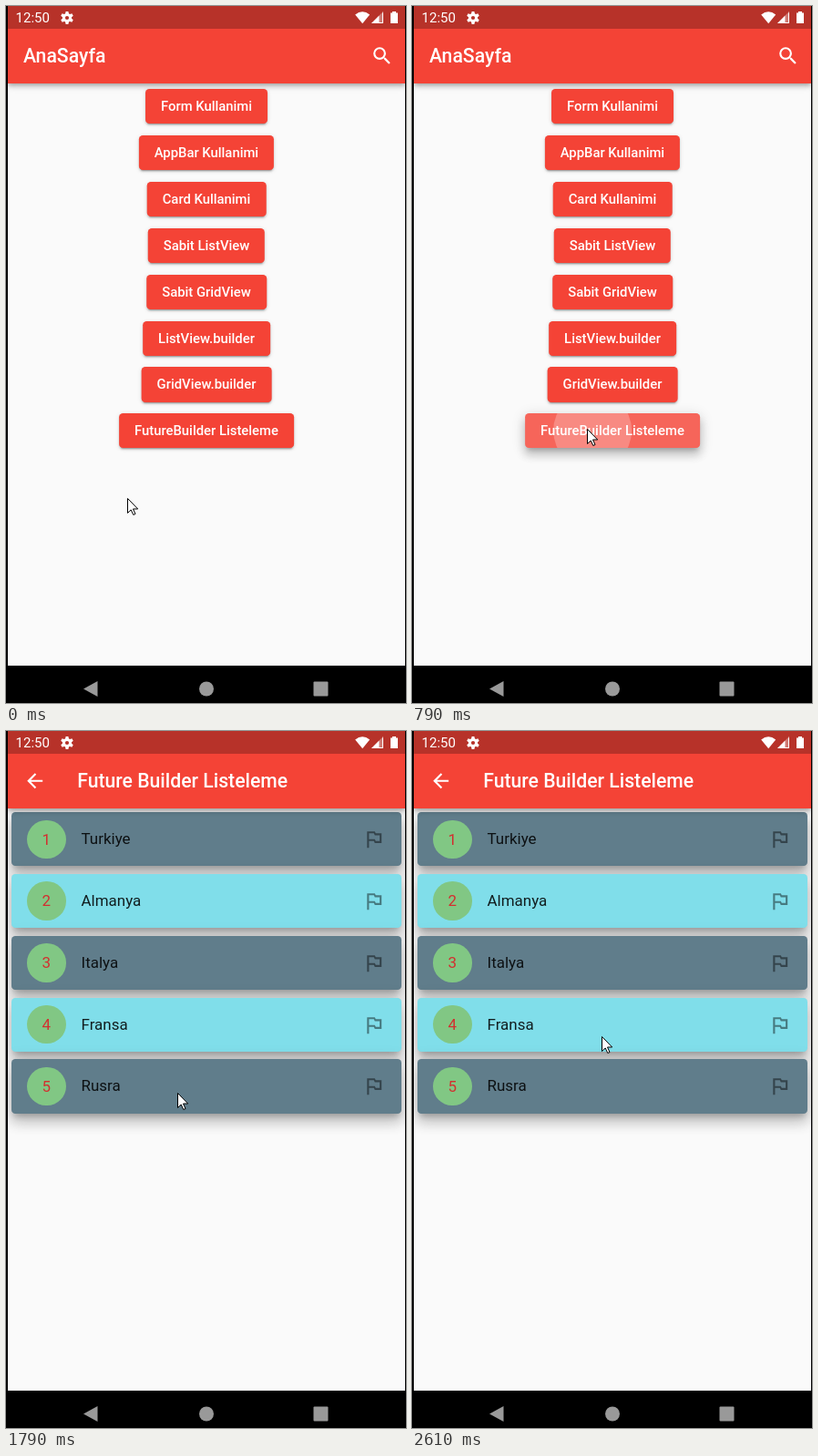
An HTML page for the animation above (3410 ms loop, 439x765 px).

```html
<!DOCTYPE html>
<html lang="tr">
<head>
<meta charset="utf-8">
<title>AnaSayfa</title>
<style>
:root { --dp: 1.06px; }
html, body { margin: 0; width: 100%; height: 100%; overflow: hidden; background: #000; }
body { position: relative; font-family: Roboto, sans-serif; }
div, svg { position: absolute; white-space: nowrap; }
svg { overflow: visible; }
#screen { left: 2px; top: 0; width: 436px; height: 724px; background: #fafafa; overflow: hidden; }
.page { inset: 0; }
.bar {
  left: 0; top: 0; width: 436px; height: calc(80 * var(--dp)); background: #f44336;
  box-shadow: 0 2px 4px -1px #0003, 0 4px 5px #00000024, 0 1px 10px #0000001f;
}
.title {
  top: calc(24 * var(--dp)); line-height: calc(56 * var(--dp));
  font-size: calc(20 * var(--dp)); font-weight: 500; color: #fff;
}
.btn {
  left: 50%; transform: translateX(-50%); height: calc(36 * var(--dp));
  padding: 0 calc(16 * var(--dp)); border-radius: calc(4 * var(--dp)); overflow: hidden;
  background: #f44336; color: #fff; font-size: calc(14 * var(--dp)); font-weight: 500;
  line-height: calc(36 * var(--dp));
  box-shadow: 0 3px 1px -2px #0003, 0 2px 2px #00000024, 0 1px 5px #0000001f;
}
.btn span { position: relative; }
.btn.press1 {
  background: #f55349;
  box-shadow: 0 3px 4px -1px #0003, 0 5px 7px #00000024, 0 1px 10px #0000001f;
}
.btn.press2 {
  background: #f6655a;
  box-shadow: 0 5px 5px -3px #0003, 0 8px 10px 1px #00000024, 0 3px 14px 2px #0000001f;
}
.ripple { border-radius: 50%; background: #ffffff3d; transform: translate(-50%, -50%); }
.card {
  left: calc(4 * var(--dp)); right: calc(4 * var(--dp)); height: calc(56 * var(--dp));
  border-radius: calc(4 * var(--dp)); font-size: calc(16 * var(--dp));
  line-height: calc(56 * var(--dp)); color: #000000de;
  box-shadow: 0 6px 6px -3px #0003, 0 10px 14px 1px #00000024, 0 4px 18px 3px #0000001f;
}
.num {
  left: calc(16 * var(--dp)); top: calc(8 * var(--dp));
  width: calc(40 * var(--dp)); height: calc(40 * var(--dp)); line-height: calc(40 * var(--dp));
  border-radius: 50%; background: #81c784; color: #d32f2f; text-align: center;
}
.name { left: calc(72 * var(--dp)); }
.icon { width: calc(24 * var(--dp)); height: calc(24 * var(--dp)); }
.flag { right: calc(16 * var(--dp)); top: calc(16 * var(--dp)); fill: #00000073; }
#status { left: 0; top: 0; width: 436px; height: 25.4px; background: #b73229; }
#clock { left: 8.6px; top: 0; font-size: 15px; line-height: 26px; color: #fff; }
#tap { left: 180px; top: 452px; width: 24px; height: 24px; border-radius: 50%; background: #ffdc0099; }
#cursor { left: 0; top: 0; }
</style>
</head>
<body>
<div id="screen">
  <div class="page" id="home">
    <div class="bar"></div>
    <div class="title" style="left:17px">AnaSayfa</div>
    <svg class="icon" viewBox="0 0 24 24" style="left:397.8px;top:42.4px" fill="#fff">
      <path d="M15.5 14h-.79l-.28-.27A6.47 6.47 0 0 0 16 9.5 6.5 6.5 0 1 0 9.5 16c1.61 0 3.09-.59 4.23-1.57l.27.28v.79l5 4.99L20.49 19zM9.5 14a4.5 4.5 0 1 1 0-9 4.5 4.5 0 0 1 0 9z"/>
    </svg>
  </div>
  <div class="page" id="list">
    <div id="cards"></div>
    <div class="bar"></div>
    <svg class="icon" viewBox="0 0 24 24" style="left:17px;top:42.4px" fill="#fff">
      <path d="M20 11H7.83l5.59-5.59L12 4l-8 8 8 8 1.41-1.41L7.83 13H20z"/>
    </svg>
    <div class="title" style="left:76.3px">Future Builder Listeleme</div>
  </div>
  <div id="status"><div id="clock">12:50</div></div>
</div>

<svg width="439" height="765" style="left:0;top:0">
  <g fill="#fff">
    <g transform="translate(67 13)">
      <g id="teeth"></g>
      <circle r="3.6" fill="none" stroke="#fff" stroke-width="3"/>
    </g>
    <path d="M391.2 19.2L383.2 9.4Q391.2 3 399.2 9.4Z"/>
    <path d="M414 6V19H401Z" opacity=".35"/>
    <path d="M409.5 10.5V19H401ZM413 8.4L414 6V19H401L402.4 18H413Z"/>
    <path d="M424 7.5V6h4v1.5h2V19h-8V7.5Z"/>
  </g>
  <g fill="#999">
    <path d="M100.5 741V758L85 749.5Z"/>
    <circle cx="220" cy="749.5" r="8"/>
    <rect x="337.5" y="741.5" width="16" height="16" rx="1"/>
  </g>
</svg>

<div id="tap"></div>
<svg id="cursor" width="12" height="19">
  <path d="M.5.5V16.5L4.2 13 6.8 18.5 9 17.5 6.5 12H11.7Z" fill="#fff" stroke="#000"/>
</svg>

<script>
const DP = 1.06, LOOP = 3410;
const $ = id => document.getElementById(id);

function add(parent, cls, html, top) {
  const el = document.createElement('div');
  el.className = cls;
  el.innerHTML = html;
  if (top !== undefined) el.style.top = top + 'px';
  parent.append(el);
  return el;
}

let target;
['Form Kullanimi', 'AppBar Kullanimi', 'Card Kullanimi', 'Sabit ListView', 'Sabit GridView',
 'ListView.builder', 'GridView.builder', 'FutureBuilder Listeleme'].forEach((label, i) => {
  target = add($('home'), 'btn', `<span>${label}</span>`, (86 + 48 * i) * DP);
});
const ripple = document.createElement('div');
ripple.className = 'ripple';
target.prepend(ripple);

const flag = `<svg class="icon flag" viewBox="0 0 24 24">
  <path d="M14 6l-1-2H5v17h2v-7h5l1 2h7V6h-6zm4 8h-4l-1-2H7V6h5l1 2h5v6z"/></svg>`;
$('cards').style.cssText = 'left:0;top:0;width:436px';
['Turkiye', 'Almanya', 'Italya', 'Fransa', 'Rusra'].forEach((name, i) => {
  const card = add($('cards'), 'card',
    `<div class="num">${i + 1}</div><div class="name">${name}</div>${flag}`, (84 + 64 * i) * DP);
  card.style.background = i % 2 ? '#80deea' : '#607d8b';
});

for (let a = 0; a < 360; a += 60)
  $('teeth').innerHTML += `<path d="M-2 -4L-1.4 -7H1.4L2 -4Z" transform="rotate(${a})"/>`;

// start time, cursor x, cursor y, press stage, page
const steps = [
  [0, 133, 540, 0, 'home'],
  [200, 146, 534, 0, 'home'],
  [390, 192, 464, 0, 'home'],
  [590, 192, 464, 1, 'home'],
  [790, 192, 464, 2, 'home'],
  [990, 192, 464, 0, 'list'],
  [1590, 189, 408, 0, 'list'],
  [1790, 188, 397, 0, 'list'],
  [2210, 197, 366, 0, 'list'],
  [2410, 208, 335, 0, 'list']
];
// ripple centre x and radius for each press stage
const rings = [[0, 0], [70, 33], [74, 43]];

function draw() {
  const t = performance.now() % LOOP;
  const [, x, y, press, page] = steps.findLast(s => s[0] <= t);
  for (const id of ['home', 'list']) $(id).style.display = id === page ? '' : 'none';
  $('cursor').style.transform = `translate(${x}px, ${y}px)`;
  $('cursor').firstElementChild.setAttribute('fill', press === 1 ? '#fff6c8' : '#fff');
  $('tap').style.display = press === 1 ? '' : 'none';
  target.className = press ? 'btn press' + press : 'btn';
  const [cx, r] = rings[press];
  ripple.style.cssText = `left:${cx}px;top:19px;width:${2 * r}px;height:${2 * r}px`;
  requestAnimationFrame(draw);
}
draw();
</script>
</body>
</html>
```
